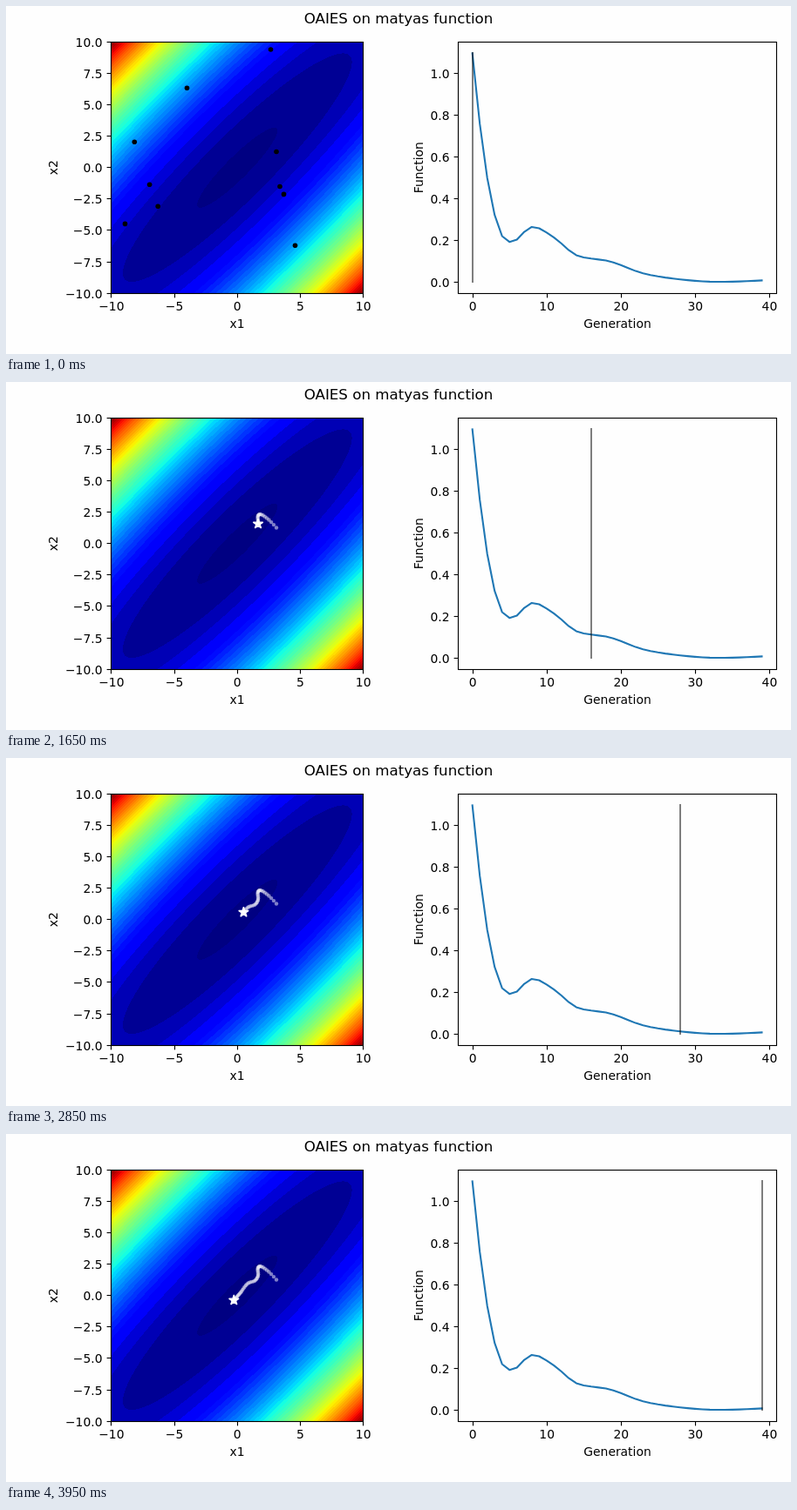
Write an HTML page with a canvas that moves like this. It is 900 px wide and 400 px high and loops after 4000 ms.

```html
<!DOCTYPE html>
<html lang="en">
<head>
<meta charset="utf-8">
<title>OAIES on matyas function</title>
<style>
  html, body { margin: 0; width: 100%; height: 100%; overflow: hidden; background: #fefefe; }
  canvas, svg { position: absolute; left: 0; top: 0; }
  canvas { left: 120px; top: 41px; }
  text { font: 13.89px "DejaVu Sans", sans-serif; }
  .title { font-size: 16.67px; }
  .axis { fill: none; stroke: #000; stroke-width: 1.11; }
</style>
</head>
<body>
<canvas id="map" width="290" height="290"></canvas>
<svg id="plot" width="900" height="400" viewBox="0 0 900 400"></svg>
<script>
const LOOP = 4000, STEP = 50, GENERATIONS = 40;
const svg = document.getElementById('plot');
const range = (n, make) => Array.from({ length: n }, (_, i) => make(i));

function add(tag, attrs) {
  const el = document.createElementNS('http://www.w3.org/2000/svg', tag);
  for (const key in attrs) el.setAttribute(key, attrs[key]);
  return svg.appendChild(el);
}

function label(str, x, y, anchor = 'middle', attrs = {}) {
  add('text', { x, y, 'text-anchor': anchor, ...attrs }).textContent = str;
}

// Smooth curve through key points [t, value, ...]; c picks the value column
function spline(keys, t, c = 1) {
  const last = keys.length - 1;
  const gap = i => keys[i + 1][0] - keys[i][0];
  const rise = i => (keys[i + 1][c] - keys[i][c]) / gap(i);
  const slope = i => {
    if (i === 0) return 2 * rise(0) - slope(1);
    if (i === last) return rise(last - 1);
    return (gap(i) * rise(i - 1) + gap(i - 1) * rise(i)) / (gap(i - 1) + gap(i));
  };
  let i = 0;
  while (i < last - 1 && keys[i + 1][0] <= t) i++;
  const h = gap(i), k = (t - keys[i][0]) / h, r = 1 - k;
  const ease = k * k * (3 - 2 * k);
  return keys[i][c] * (1 - ease) + keys[i + 1][c] * ease
    + h * k * r * (r * slope(i) - k * slope(i + 1));
}

// Jet colour map: each channel is a trapezoid between two ramps
const clamp = v => Math.min(1, Math.max(0, v));
const ramp = (v, from, to) => clamp((v - from) / (to - from));
const jet = v => [
  ramp(v, .35, .66) - ramp(v, .89, 1) / 2,
  ramp(v, .125, .375) - ramp(v, .64, .91),
  .5 + ramp(v, 0, .11) / 2 - ramp(v, .34, .65)
].map(n => Math.round(255 * clamp(n)));

// Filled contours of the Matyas function, with wider bands around the minimum
const MX = 265.25, MY = 185.75, UNIT = 14.44;
const LOW = [0, .39, 3.18, 6, 9, 12.5];
const matyas = (x, y) => .26 * (x * x + y * y) - .48 * x * y;

function band(f) {
  if (f >= 12.5) return 13.5 + 2 * Math.floor((f - 12.5) / 2);
  const i = LOW.findIndex(v => v > f);
  return (LOW[i - 1] + LOW[i]) / 2;
}

function drawMap() {
  const ctx = document.getElementById('map').getContext('2d');
  const img = ctx.createImageData(290, 290);
  for (let j = 0; j < 290; j++) {
    for (let i = 0; i < 290; i++) {
      const f = matyas((i + 120.5 - MX) / UNIT, (MY - j - 41.5) / UNIT);
      img.data.set([...jet(band(f) / 100), 255], 4 * (j * 290 + i));
    }
  }
  ctx.putImageData(img, 0, 0);
}

// Axes
const snap = v => Math.floor(v) + .5;
const minus = s => s.replace('-', '\u2212');

function xTick(x, str) {
  add('path', { class: 'axis', d: `M${snap(x)} 331v4.4` });
  label(minus(str), x, 350);
}

function yTick(left, y, str) {
  add('path', { class: 'axis', d: `M${left} ${snap(y)}h-4.9` });
  label(minus(str), left - 10, snap(y) + 5, 'end');
}

function yTitle(str, x) {
  label(str, 0, 0, 'middle', { transform: `translate(${x} 185.7) rotate(-90)` });
}

const FX = g => 534.7 + 8.508 * g;
const FY = f => 317.1 - 239.3 * f;

function drawAxes() {
  label('OAIES on matyas function', 450, 20, 'middle', { class: 'title' });
  for (let v = -10; v <= 10; v += 5) xTick(MX + v * UNIT, String(v));
  for (let v = -10; v <= 10; v += 2.5) yTick(120.5, MY - v * UNIT, v.toFixed(1));
  for (let v = 0; v <= 40; v += 10) xTick(FX(v) + .4, String(v));
  for (let i = 0; i <= 5; i++) yTick(518.5, FY(i / 5), (i / 5).toFixed(1));
  label('x1', 265, 370);
  label('Generation', 701, 370);
  yTitle('x2', 59);
  yTitle('Function', 478);
}

// Key points: generation, best value
const VALUE = [
  [0, 1.098], [2, .5], [4, .22], [5, .192], [8, .264], [11, .213], [14, .128],
  [16, .112], [18, .103], [23, .041], [28, .012], [32, .001], [36, .002], [39, .007]
];

// Key points: generation, x, y
const PATH = [
  [0, 310, 167.5], [4, 299, 156.4], [8, 291.3, 152], [11, 288.8, 154], [16, 289, 163],
  [20, 285.5, 168.5], [24, 278, 171.3], [31, 269, 182.2], [39, 261.3, 191]
];
const best = g => [spline(PATH, g), spline(PATH, g, 2)];

// First population, spread over the whole domain
const START = [
  [303.5, 50], [207.5, 94.3], [147.3, 156.2], [310, 167.5], [164.6, 205.3],
  [314, 207.5], [318.5, 216.4], [174.2, 230.2], [136.5, 250.4], [331.5, 275.3]
];

function random(n) {
  const s = Math.sin(n * 12.9898 + 4.1) * 43758.5453;
  return s - Math.floor(s);
}

// Later populations gather closely around the best point
function sample(g, i) {
  const [x, y] = best(g);
  const r = 1.7 * Math.sqrt(random(g * 20 + i));
  const a = 2 * Math.PI * random(g * 20 + i + 10);
  return [x + r * Math.cos(a), y + r * Math.sin(a)];
}

function starPoints(r) {
  return range(10, i => {
    const a = Math.PI * i / 5, d = i % 2 ? r * .382 : r;
    return `${d * Math.sin(a)},${-d * Math.cos(a)}`;
  }).join(' ');
}

drawMap();
drawAxes();

const trail = range(GENERATIONS, g => {
  const [cx, cy] = best(g);
  return add('circle', { cx, cy, r: 2.2, fill: '#fff', opacity: .5 });
});
const star = add('polygon', {
  points: starPoints(6), fill: '#fff', stroke: '#fff', 'stroke-width': 1.39, 'stroke-linejoin': 'bevel'
});
const dots = START.map(() => add('circle', { r: 2.8 }));

add('polyline', {
  points: range(GENERATIONS, g => `${FX(g)},${FY(spline(VALUE, g))}`).join(' '),
  fill: 'none', stroke: '#1f77b4', 'stroke-width': 2.08, 'stroke-linejoin': 'round', 'stroke-linecap': 'square'
});
const cursor = add('path', { d: 'M0 53V318', stroke: '#000', 'stroke-width': 2, opacity: .5 });

add('rect', { class: 'axis', x: 120.5, y: 41.5, width: 289, height: 289 });
add('rect', { class: 'axis', x: 518.5, y: 41.5, width: 365, height: 289 });

const show = (el, on) => el.setAttribute('visibility', on ? 'visible' : 'hidden');
const move = (el, x, y) => el.setAttribute('transform', `translate(${x} ${y})`);

// Odd steps advance the generation, even steps show its population
function render(step) {
  const first = step === 0;
  const g = first ? 0 : Math.floor((step - 1) / 2);
  trail.forEach((el, i) => show(el, !first && i <= g));
  show(star, !first);
  move(star, ...best(g));
  dots.forEach((el, i) => {
    show(el, step % 2 === 0);
    move(el, ...(first ? START[i] : sample(g, i)));
  });
  move(cursor, Math.round(FX(g)), 0);
}

const begin = performance.now();
let shown = -1;

function tick() {
  const step = Math.floor((performance.now() - begin) % LOOP / STEP);
  if (step !== shown) render(shown = step);
  requestAnimationFrame(tick);
}
tick();
</script>
</body>
</html>
```
